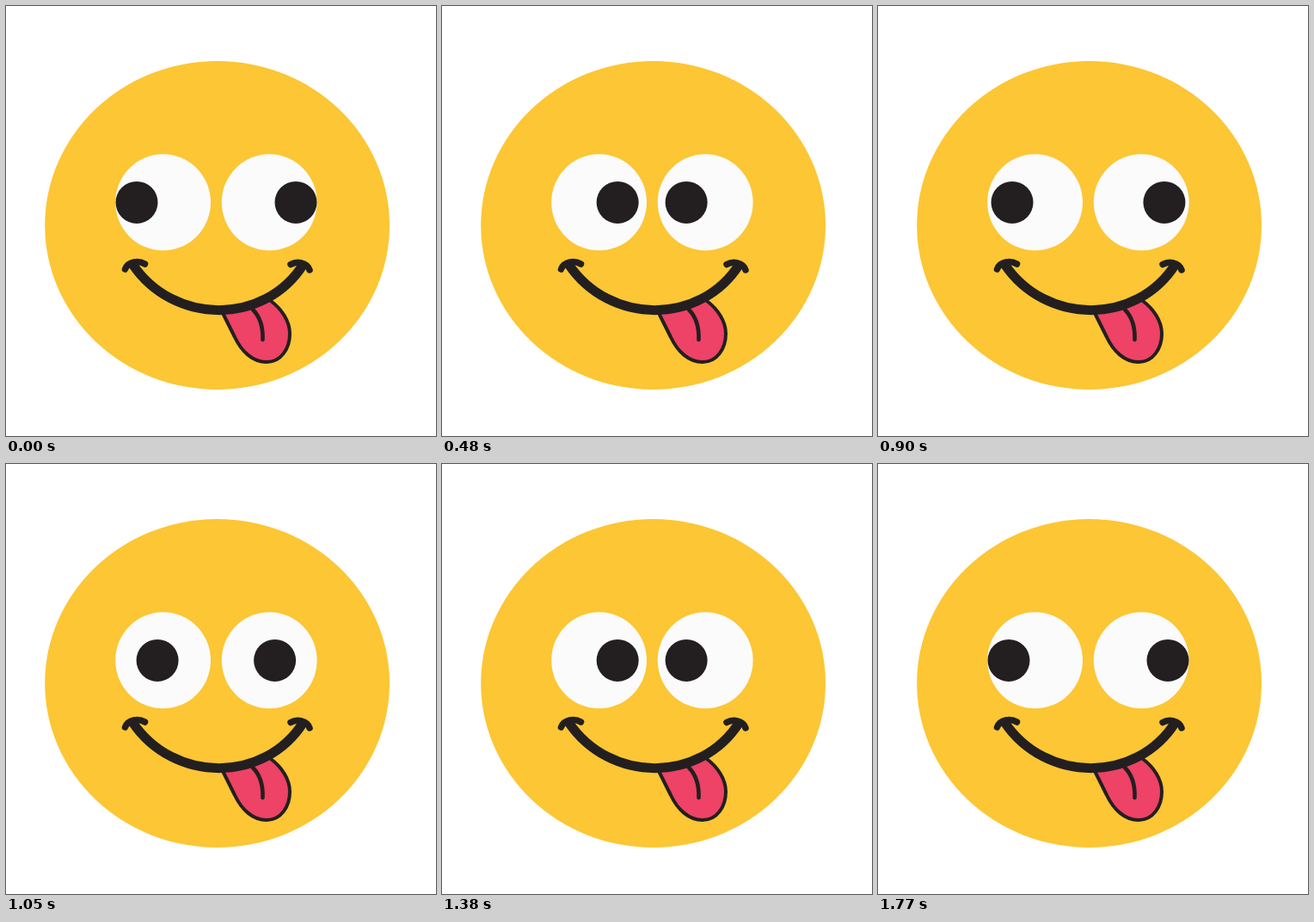
These frames come from a looping animation (500x500 px, 1800 ms). An HTML page:

```html
<!DOCTYPE html>
<html lang="en">
<head>
<meta charset="utf-8">
<title>Silly face</title>
<style>
  html, body { margin: 0; width: 100%; height: 100%; overflow: hidden; background: #fff; }
  svg { display: block; width: 100%; height: 100%; }
  .line { fill: none; stroke: #231f20; stroke-linecap: round; stroke-linejoin: round; }
</style>
</head>
<body>
<svg viewBox="0 0 500 500">
  <ellipse cx="245.6" cy="255" rx="200.4" ry="191" fill="#fcc634"/>
  <g fill="#fbfbfb">
    <ellipse cx="182.6" cy="228.3" rx="55.4" ry="56"/>
    <ellipse cx="306.2" cy="228.3" rx="55.4" ry="56"/>
  </g>
  <g fill="#231f20">
    <circle id="left" cx="152" cy="228.4" r="24.5"/>
    <circle id="right" cx="337" cy="228.4" r="24.5"/>
  </g>
  <path class="line" style="fill:#ee4266" stroke-width="4"
    d="M252 357L266 385C274 402 287 414 303 414C320 414 330 398 330 381C330 366 320 352 308 343"/>
  <path class="line" stroke-width="4.6" d="M287 353C296 362 299 373 298.5 388"/>
  <path class="line" stroke-width="11" stroke-linecap="butt" style="stroke-linecap:butt"
    d="M147 300C195 371.5 301 371.5 346 300"/>
  <path class="line" stroke-width="7.5" d="M138.5 306C142 297 154 295.500 161.500 300M331 300.500C338 296.500 350 298 353 307"/>
</svg>
<script>
  const left = document.getElementById('left');
  const right = document.getElementById('right');
  const STEP = 30, STEPS = 60;
  const turns = [0, 14, 29, 44, 59];  // steps at which the pupils reverse

  // 0 = pupils apart, 1 = pupils together
  function squint(step) {
    const i = Math.min(turns.findLastIndex(t => t <= step), 3);
    const p = (step - turns[i]) / (turns[i + 1] - turns[i]);
    return i % 2 ? 1 - p : p;
  }

  function draw(now) {
    const s = squint(Math.floor(now / STEP) % STEPS);
    left.setAttribute('cx', 152 + 60.2 * s);
    right.setAttribute('cx', 337 - 61 * s);
  }

  const start = performance.now();
  function tick() {
    draw(performance.now() - start);
    requestAnimationFrame(tick);
  }
  tick();
</script>
</body>
</html>
```
